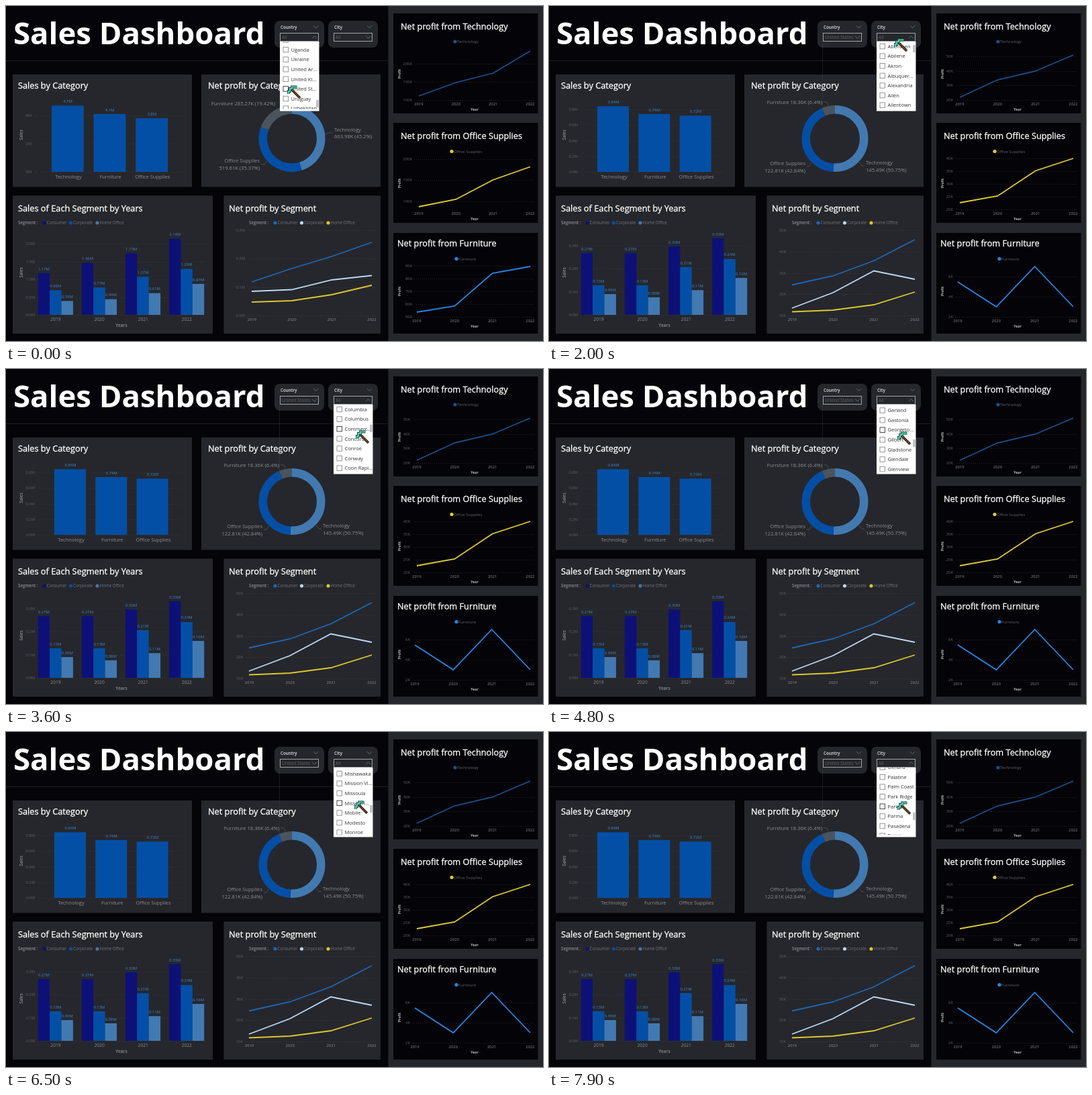
An HTML page with a canvas for the animation above (8 s loop, 800x499 px).

```html
<!DOCTYPE html>
<html lang="en">
<head>
<meta charset="utf-8">
<title>Sales Dashboard</title>
<style>
html, body { margin: 0; width: 100%; height: 100%; overflow: hidden; background: #040409; }
canvas { display: block; }
</style>
</head>
<body>
<canvas id="stage" width="800" height="499"></canvas>
<script>
const ctx = document.getElementById('stage').getContext('2d');
const LOOP = 8000, ROW = 14.6;
const PANEL = '#26272c', BLUE = '#044fa6', STEEL = '#4279b1', NAVY = '#0d1177', SLATE = '#4a545e';
const DIM = '#5f6063', GREY = '#8c8d90', LABEL = '#3f86cc';
const YEARS = ['2019', '2020', '2021', '2022'];
const SEGMENTS = ['Consumer', 'Corporate', 'Home Office'];

const countries = ['Turkmenistan', 'Uganda', 'Ukraine', 'United Arab Emirates', 'United Kingdom', 'United States', 'Uruguay', 'Uzbekistan'];
const cities = ('Aberdeen,Abilene,Akron,Albuquerque,Alexandria,Allen,Allentown,Altoona,Amarillo,Anaheim,Andover,Ann Arbor,Antioch,Apopka,Apple Valley,Appleton,Arlington,Arlington Heights,Arvada,Asheville,Athens,Atlanta,Atlantic City,Auburn,Aurora,Austin,Avondale,Bakersfield,Baltimore,Bangor,Bartlett,Bayonne,Baytown,Beaumont,Bedford,Belleville,Bellevue,Bellingham,Bethlehem,Beverly,Billings,Bloomington,Boca Raton,Boise,Bolingbrook,Bossier City,Bowling Green,Boynton Beach,Bozeman,Brentwood,Bridgeton,Bristol,Broken Arrow,Broomfield,Brownsville,Bryan,Buffalo,Burbank,Burlington,Caldwell,Camarillo,Cambridge,Canton,Carlsbad,Carol Stream,Carrollton,Cary,Cedar Hill,Cedar Rapids,Champaign,Chandler,Chapel Hill,Charlotte,Charlottesville,Chattanooga,Chesapeake,Chester,Cheyenne,Chicago,Chico,Chula Vista,Cincinnati,Citrus Heights,Clarksville,Cleveland,Clifton,Clinton,Clovis,Coachella,College Station,Colorado Springs,Columbia,Columbus,Commerce City,Concord,Conroe,Conway,Coon Rapids,Coppell,Coral Gables,Coral Springs,Corpus Christi,Costa Mesa,Cottage Grove,Covington,Cranston,Cuyahoga Falls,Dallas,Danbury,Danville,Davis,Daytona Beach,Dearborn,Dearborn Heights,Decatur,Delray Beach,Deltona,Denver,Des Moines,Des Plaines,Detroit,Dover,Draper,Dublin,Dubuque,Durham,Eagan,East Orange,East Point,Eau Claire,Edinburg,Edmond,Edmonds,El Cajon,El Paso,Elkhart,Elmhurst,Elyria,Encinitas,Englewood,Escondido,Eugene,Evanston,Everett,Fairfield,Fargo,Farmington,Fayetteville,Florence,Fort Collins,Fort Lauderdale,Fort Worth,Frankfort,Franklin,Freeport,Fremont,Fresno,Frisco,Gaithersburg,Garden City,Garland,Gastonia,Georgetown,Gilbert,Gladstone,Glendale,Glenview,Goldsboro,Grand Island,Grand Prairie,Grand Rapids,Grapevine,Great Falls,Greeley,Green Bay,Greensboro,Greenville,Greenwood,Gresham,Grove City,Gulfport,Hackensack,Hagerstown,Haltom City,Hamilton,Hampton,Harlingen,Harrisonburg,Hattiesburg,Helena,Hempstead,Henderson,Hendersonville,Hesperia,Hialeah,Hickory,Highland Park,Hillsboro,Holland,Hollywood,Holyoke,Homestead,Hoover,Hot Springs,Houston,Huntington Beach,Huntsville,Independence,Indianapolis,Inglewood,Iowa City,Irving,Jackson,Jacksonville,Jamestown,Jefferson City,Johnson City,Jonesboro,Jupiter,Keller,Kenner,Kennewick,Kenosha,Kent,Kirkwood,Knoxville,La Crosse,La Mesa,La Porte,La Quinta,Lafayette,Laguna Niguel,Lake Charles,Lake Elsinore,Lake Forest,Lakeland,Lakeville,Lakewood,Lancaster,Lansing,Laredo,Las Cruces,Las Vegas,Laurel,Lawrence,Lawton,Layton,League City,Lebanon,Lehi,Leominster,Lewiston,Lincoln Park,Linden,Lindenhurst,Little Rock,Littleton,Lodi,Logan,Long Beach,Longmont,Longview,Lorain,Los Angeles,Louisville,Loveland,Lowell,Lubbock,Macon,Madison,Malden,Manchester,Manhattan,Mansfield,Manteca,Maple Grove,Margate,Marietta,Marion,Marlborough,Marysville,Mason,Mcallen,Medford,Medina,Melbourne,Memphis,Mentor,Meriden,Meridian,Mesa,Mesquite,Miami,Middletown,Midland,Milford,Milwaukee,Minneapolis,Miramar,Mishawaka,Mission Viejo,Missoula,Missouri City,Mobile,Modesto,Monroe,Montebello,Montgomery,Moorhead,Moreno Valley,Morgan Hill,Morristown,Mount Pleasant,Mount Vernon,Murfreesboro,Murray,Murrieta,Muskogee,Naperville,Nashua,Nashville,New Albany,New Bedford,New Brunswick,New Castle,New Rochelle,New York City,Newark,Newport News,Niagara Falls,Noblesville,Norfolk,Normal,Norman,North Charleston,North Las Vegas,North Miami,Norwich,Oak Park,Oakland,Oceanside,Odessa,Oklahoma City,Olathe,Olympia,Omaha,Ontario,Orange,Orem,Orland Park,Orlando,Ormond Beach,Oswego,Overland Park,Owensboro,Oxnard,Palatine,Palm Coast,Park Ridge,Parker,Parma,Pasadena,Pasco,Passaic,Paterson').split(',');

// Scroll position that puts the named city at height y.
const at = (name, y) => cities.indexOf(name) - (y - 60) / ROW;
const misha = at('Mishawaka', 62), palat = at('Palatine', 67), span = palat - misha;
const scrollKeys = [[2300, 0], [2800, at('Beverly', 69)], [3600, at('Columbia', 60)], [3700, at('Columbia', 60)],
  [4800, at('Garland', 61.5)], [6500, misha], [6700, misha + span * .2], [6900, misha + span * .2],
  [7200, misha + span * .48], [7300, misha + span * .48], [7900, palat]];
const thumbKeys = [[2300, 58], [2800, 91], [3600, 83], [4800, 105], [6500, 109], [7900, 120]];
const cursorX = [[900, 419], [1300, 514], [2100, 514], [2700, 522], [3600, 521], [4800, 519]];
const cursorY = [[900, 118], [1300, 48], [2100, 48], [2700, 87], [3600, 91], [4800, 93], [6500, 102], [7900, 103]];

const mix = (a, b, p) => a + (b - a) * p;
const clamp = v => Math.max(0, Math.min(1, v));
const ease = v => { v = clamp(v); return v * v * (3 - 2 * v); };

function track(keys, t) {
  if (t <= keys[0][0]) return keys[0][1];
  for (let i = 1; i < keys.length; i++) {
    const [t0, v0] = keys[i - 1], [t1, v1] = keys[i];
    if (t <= t1) return mix(v0, v1, (t - t0) / (t1 - t0));
  }
  return keys[keys.length - 1][1];
}

function rect(x, y, w, h, color) { ctx.fillStyle = color; ctx.fillRect(x, y, w, h); }

function path(points, color, width) {
  ctx.beginPath();
  points.forEach(([x, y]) => ctx.lineTo(x, y));
  ctx.strokeStyle = color; ctx.lineWidth = width; ctx.stroke();
}

function setFont(size, weight = 400) { ctx.font = `${weight} ${size}px "Open Sans", "Noto Sans", sans-serif`; }

// y is the middle of the capital letters.
function text(s, x, y, size, color, align = 'left', weight = 400) {
  setFont(size, weight);
  ctx.fillStyle = color; ctx.textAlign = align;
  ctx.fillText(s, x, y + size * .36);
}

// Card titles are slightly heavier than the regular weight.
function heading(s, x, y) {
  const size = 12.75;
  text(s, x, y, size, '#fff');
  ctx.strokeStyle = '#fff'; ctx.lineWidth = .3;
  ctx.strokeText(s, x, y + size * .36);
}

function sideways(s, x, y, size, color) {
  ctx.save();
  ctx.translate(x, y); ctx.rotate(-Math.PI / 2);
  text(s, 0, 0, size, color, 'center', 600);
  ctx.restore();
}

function dot(x, y, color) {
  ctx.beginPath(); ctx.arc(x, y, 2.6, 0, 7); ctx.fillStyle = color; ctx.fill();
}

// Tick labels evenly spread from top to bottom, with dotted grid lines.
function axis(labels, x, top, bottom, x0, x1, grid) {
  labels.forEach((s, i) => {
    const y = mix(top, bottom, i / (labels.length - 1));
    text(s, x, y, 5.9, DIM, 'right');
    ctx.setLineDash([1, 2]);
    path([[x0, Math.round(y) + .5], [x1, Math.round(y) + .5]], grid, 1);
    ctx.setLineDash([]);
  });
}

function segmentLegend(x, colors) {
  text('Segment :', x, 323, 6.2, GREY, 'left', 600);
  SEGMENTS.forEach((s, i) => {
    const cx = x + 39 + i * 39.5;
    dot(cx, 323, colors[i]);
    text(s, cx + 3.6, 323, 6.2, '#737477');
  });
}

function categoryBars(us, p) {
  heading('Sales by Category', 18, 118);
  sideways('Sales', 23, 192, 6.2, GREY);
  if (us) axis(['0.8M', '0.6M', '0.4M', '0.2M', '0.0M'], 43, 154, 247, 47, 262, '#34353a');
  else axis(['4M', '2M', '0M'], 38, 163, 247, 42, 262, '#34353a');
  const all = [4.7, 4.1, 3.8], states = [.84, .74, .72];
  ['Technology', 'Furniture', 'Office Supplies'].forEach((name, i) => {
    const x = mix(68 + i * 62.6, 72 + i * 61.3, p), h = mix(all[i] * 21, states[i] * 116.3, p);
    rect(x, 247 - h, mix(47.8, 47, p), h, BLUE);
    text(us ? states[i].toFixed(2) + 'M' : all[i].toFixed(1) + 'M', x + 24, 240.5 - h, 5.9, LABEL, 'center');
    text(name, x + 25, 254, 7.5, GREY, 'center');
  });
}

function donut(us, p) {
  heading('Net profit by Category', 301, 118);
  const ends = [0, mix(.452, .5075, p), mix(.8057, .936, p), 1];
  const outer = 49.5, inner = 37;
  [STEEL, BLUE, SLATE].forEach((color, i) => {
    ctx.beginPath();
    ctx.arc(426, 197.5, (outer + inner) / 2, (ends[i] - .25) * 2 * Math.PI, (ends[i + 1] - .25) * 2 * Math.PI);
    ctx.strokeStyle = color; ctx.lineWidth = outer - inner; ctx.stroke();
  });
  const pair = (a, b, x, y, align) => { text(a, x, y, 7.6, GREY, align); text(b, x, y + 10.5, 7.6, GREY, align); };
  const lead = points => path(points, '#55565a', .8);
  if (us) {
    text('Furniture 18.36K (6.4%)', 407, 143, 7.6, GREY, 'right');
    pair('Technology', '145.49K (50.75%)', 472, 233.5);
    pair('Office Supplies', '122.81K (42.84%)', 382, 234.5, 'right');
    lead([[409, 143], [414, 143], [416, 148]]);
    lead([[462, 233], [466, 238], [470, 238]]);
    lead([[391, 234], [388, 239], [384, 239]]);
  } else {
    text('Furniture 285.27K (19.42%)', 401, 145, 7.6, GREY, 'right');
    pair('Technology', '663.98K (45.2%)', 489, 184);
    pair('Office Supplies', '519.61K (35.37%)', 378, 230.5, 'right');
    lead([[475, 191], [481, 189], [487, 189]]);
    lead([[388, 231], [385, 236], [380, 236]]);
  }
}

const segAll = [[1.17, 1.46, 1.73, 2.14], [.69, .77, 1.07, 1.29], [.39, .44, .61, .87]];
const segUs = [[.268, .268, .297, .332], [.128, .128, .207, .242], [.09, .076, .107, .16]];

function segmentBars(us, p) {
  const colors = [NAVY, BLUE, STEEL];
  heading('Sales of Each Segment by Years', 18, 301);
  segmentLegend(18, colors);
  if (us) axis(['0.3M', '0.2M', '0.1M', '0.0M'], 43, 357, 460, 47, 298, '#34353a');
  else axis(['2.0M', '1.5M', '1.0M', '0.5M', '0.0M'], 43, 354, 460, 47, 298, '#34353a');
  sideways('Sales', 23, 397, 6.2, GREY);
  text('Years', 172, 476, 6.6, GREY, 'center', 600);
  YEARS.forEach((year, g) => {
    colors.forEach((color, s) => {
      const x = 47.7 + g * 65.1 + s * 17.4;
      const h = mix(segAll[s][g] * 53, segUs[s][g] * 343.5, p);
      rect(x, 460 - h, 17.4, h, color);
      text((us ? segUs : segAll)[s][g].toFixed(2) + 'M', x + 8.7, 453.5 - h, 5.9, LABEL, 'center');
    });
    text(year, 74 + g * 65.1, 467, 6.7, GREY, 'center');
  });
}

// Lines keep their old shape, moved left, until the new one eases in.
function line(x0, x1, nx0, before, after, color, us, p) {
  path(before.map((y, i) => [
    mix(mix(x0, x1, i / 3) - (us ? 3.5 : 0), mix(nx0, x1, i / 3), p), mix(y, after[i], p)]), color, 1.8);
}

function segmentLines(us, p) {
  const colors = ['#1c68b8', '#bad8f5', '#dcc62e'];
  const before = [[411, 391, 373, 352], [425, 422.5, 408, 401.5], [441, 439, 430, 416]];
  const after = [[415.5, 402, 379.5, 348], [450, 427, 394.5, 407], [455.5, 453, 445, 426]];
  heading('Net profit by Segment', 332, 301);
  segmentLegend(362, colors);
  if (us) axis(['50K', '40K', '30K', '20K', '10K'], 353, 334, 461, 357, 551, '#3a3b40');
  else axis(['0.3M', '0.2M', '0.1M', '0.0M'], 356, 334, 461, 360, 551, '#3a3b40');
  YEARS.forEach((s, i) => text(s, mix(us ? 362.5 : 366.5, 545, i / 3), 467, 5.9, GREY, 'center'));
  colors.forEach((c, i) => line(366, 545, 362, before[i], after[i], c, us, p));
}

const trends = [
  { name: 'Technology', tx: 588, ty: 30, y: 11, h: 149, color: '#1b4f8c', x: 615, legend: [669, 53], ticks: [['200K', '150K', '100K'], ['50K', '40K', '30K', '20K']],
    tops: [86, 75], base: 140, before: [134, 114, 100, 67], after: [136, 110, 97, 73] },
  { name: 'Office Supplies', tx: 588, ty: 193, y: 174, h: 149, color: '#e3cb38', x: 615, legend: [664, 216.5], ticks: [['200K', '150K', '100K'], ['40K', '35K', '30K', '25K', '20K']],
    tops: [228, 227], base: 303, firstBase: 290.5, before: [299, 288, 259, 239.5], after: [293, 283, 245.5, 227] },
  { name: 'Furniture', tx: 583, ty: 353, y: 338, h: 150, color: '#2587e6', x: 612, legend: [671, 376.5], ticks: [['90K', '80K', '70K', '60K', '50K'], ['6K', '4K', '2K']],
    tops: [387, 403], base: 463, before: [456, 447, 398, 388], after: [411, 448, 388, 448] }
];

function trend(c, us, p) {
  const k = us ? 1 : 0, bottom = us ? c.base : c.firstBase || c.base;
  rect(577, c.y, 215.5, c.h, '#040408');
  heading('Net profit from ' + c.name, c.tx, c.ty);
  dot(c.legend[0], c.legend[1], c.color);
  text(c.name, c.legend[0] + 3, c.legend[1], 6.1, '#626367');
  axis(c.ticks[k], us ? 602 : 605, c.tops[k], bottom, c.x - 7, 788, '#242529');
  sideways('Profit', 586, c.y + 90 - (c.name === 'Furniture' ? 3 : 0), 5.4, '#ddd');
  YEARS.forEach((s, i) => text(s, mix(c.x - 3 * k, 781, i / 3), c.base + 5.7, 5.9, GREY, 'center'));
  text('Year', 698, c.base + 13.7, 5.4, '#ddd', 'center', 600);
  line(c.x, 781, c.x - 3, c.before, c.after, c.color, us, p);
}

function chevron(x, y, up) {
  const d = up ? -1.8 : 1.8;
  path([[x - 3.5, y - d], [x, y + d], [x + 3.5, y - d]], '#77787b', .8);
}

function slicer(x, title, value, open) {
  ctx.beginPath(); ctx.roundRect(x, 22, 74, 40, 8); ctx.fillStyle = PANEL; ctx.fill();
  text(title, x + 9, 32, 6.1, '#c4c4c6', 'left', 700);
  chevron(x + 61.5, 31, false);
  ctx.strokeStyle = '#a3a4a7'; ctx.lineWidth = 1;
  ctx.strokeRect(x + 8.5, 40.5, 57, 12);
  text(value, x + 11, 46.5, 6.8, '#5d5e61');
  chevron(x + 59.5, 46.5, open);
}

function shorten(s, width) {
  setFont(7.5);
  if (ctx.measureText(s).width <= width) return s;
  while (ctx.measureText(s + '...').width > width) s = s.slice(0, -1);
  return s.trimEnd() + '...';
}

function dropdown(x, items, firstY, checked, thumb, pointerY) {
  rect(x, 53, 58.5, 103.5, '#fff');
  ctx.save();
  ctx.beginPath(); ctx.rect(x, 53, 58.5, 100.5); ctx.clip();
  items.forEach((s, i) => {
    const y = firstY + i * ROW;
    if (y < 40 || y > 170) return;
    if (s === checked) rect(x + 4.5, y - 4, 8.5, 8.5, '#3b3a39');
    else {
      ctx.strokeStyle = Math.abs(y - pointerY) < ROW / 2 ? '#333' : '#8a8a8a';
      ctx.lineWidth = .9;
      ctx.strokeRect(x + 5, y - 3.7, 7.5, 7.5);
    }
    text(shorten(s, 42), x + 16.5, y, 7.5, '#333');
  });
  rect(x + 54, thumb, 4.5, 11, '#c4c4c6');
  ctx.restore();
}

function pickaxe(x, y) {
  ctx.save();
  ctx.translate(x, y);
  const head = [[2, 13], [2, 9], [4, 9], [4, 5], [7, 5], [7, 2.5], [14.5, 2.5]];
  path([[6, 6], [19, 19]], '#20150c', 3.6);
  path(head, '#0e3f36', 3.8);
  ctx.setLineDash([2, 1]);
  path([[7, 7], [18.5, 18.5]], '#86602f', 1.8);
  ctx.setLineDash([]);
  path(head, '#55cfb4', 2.2);
  ctx.restore();
}

function draw(t) {
  const barsUs = t >= 800, barP = ease((t - 800) / 400);
  const linesUs = t >= 1000, lineP = ease((t - 1300) / 500);
  const cityOpen = t >= 2000, pick = t >= 300 ? 'United States' : '';
  const px = track(cursorX, t), py = track(cursorY, t);

  rect(0, 0, 800, 499, '#040409');
  rect(569.5, 0, 230.5, 499, PANEL);
  rect(0, 81, 569, 1, '#1d1e22');
  text('Sales Dashboard', 11, 41, 45.5, '#fff', 'left', 700);
  rect(10, 102, 267, 167.5, PANEL);
  rect(291, 102, 267, 167.5, PANEL);
  rect(10, 282.5, 298, 205.5, PANEL);
  rect(324.5, 282.5, 233.5, 205.5, PANEL);

  categoryBars(barsUs, barP);
  donut(barsUs, barP);
  segmentBars(barsUs, barP);
  segmentLines(linesUs, lineP);
  trends.forEach(c => trend(c, linesUs, lineP));

  slicer(400, 'Country', pick || 'All', !cityOpen);
  slicer(480, 'City', 'All', cityOpen);
  if (cityOpen) {
    rect(407, 54, 1, 102, 'rgba(80, 81, 88, .3)');
    dropdown(488, cities, 60 - track(scrollKeys, t) * ROW, '', track(thumbKeys, t), py + 3);
  } else {
    dropdown(408, countries, 65 - ROW, pick, 140, py + 3);
  }
  pickaxe(px, py);
}

function tick() {
  const t = performance.now() % LOOP;
  draw(Math.floor(t / 100) * 100);
  requestAnimationFrame(tick);
}
tick();
</script>
</body>
</html>
```
